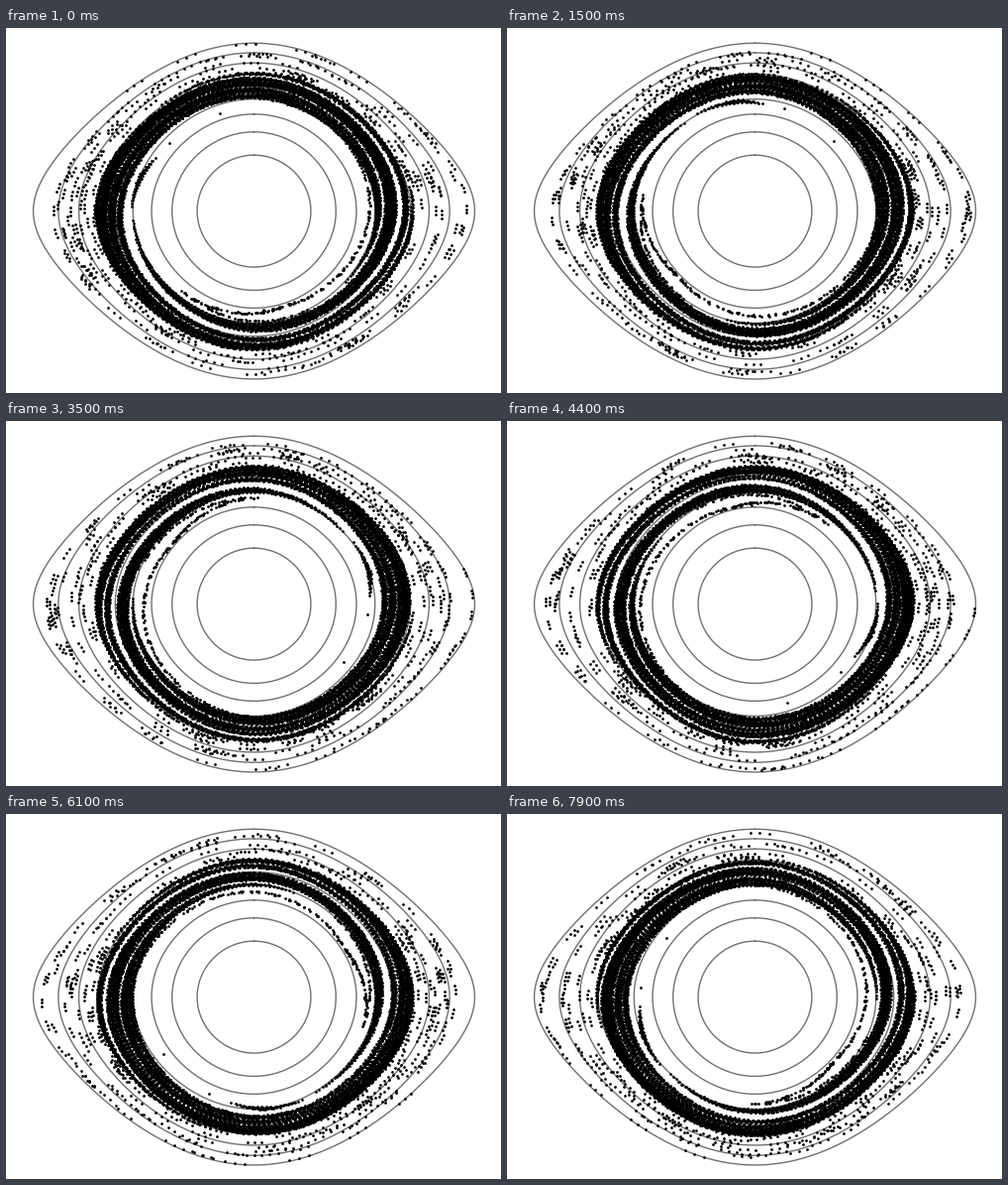
Write a matplotlib script that moves like this. It is 500x368 px and loops after 8000 ms.

```python
import numpy as np
import matplotlib.pyplot as plt
from matplotlib.animation import FuncAnimation

W, H, DPI = 500, 368, 100
CX, CY = 250.5, 184.6
SCALE = 89.25            # pixels per radian
FRAMES, INTERVAL = 80, 100
T0, DT = 78.0, 0.0796    # elapsed time and step, in units of 1/omega0
TAU = 2 * np.pi

rng = np.random.default_rng(4)


def agm(a, b):
    for _ in range(8):
        a, b = (a + b) / 2, np.sqrt(a * b)
    return a


def freq(k):
    return agm(1.0, np.sqrt(1 - k * k))


class Orbits:
    """Exact pendulum libration, as a Fourier series in the phase."""

    def __init__(self, k):
        self.w = freq(k)
        q = np.exp(-np.pi * self.w / agm(1.0, k))
        self.terms = [(n, 8 * q ** (n / 2) / (1 + q ** n)) for n in range(1, 14, 2)]

    def pixels(self, phase):
        x = sum(c / n * np.sin(n * phase) for n, c in self.terms)
        p = self.w * sum(c * np.cos(n * phase) for n, c in self.terms)
        return CX + SCALE * x, CY - SCALE * p


K_TAB = np.linspace(0.4, 0.97, 600)
W_TAB = freq(K_TAB)


def modulus(w):
    return np.interp(w, W_TAB[::-1], K_TAB[::-1])


rows_w, rows_phi = [], []


def add_row(w, phi):
    phi = np.atleast_1d(phi)
    rows_w.append(np.full(len(phi), w))
    rows_phi.append(phi)


# outer spiral: one triplet per row at the rim, more and wider spread inwards
for w in np.arange(0.6128, 0.806, 0.0029):
    d = (w - 0.6128) / 0.19
    triplet = 0.037 * np.arange(3)
    add_row(w, 2.02 - triplet)
    for _ in range(int(0.5 + 6 * d)):
        start = 2.0 - rng.uniform(0, min(TAU, 8 * d))
        add_row(w + rng.uniform(0, 0.0029), start - triplet)

# dense ring, cut by spiral gaps: phase, width at the outer and the inner rim
RING = (0.800, 0.884)
GAPS = [(5.8, 0.6, 1.9), (2.9, 0.0, 0.7), (1.35, 0.8, 0.0)]
for w in np.arange(*RING, 0.0013):
    phi = np.arange(0, TAU, 0.033) + rng.uniform(0, 0.033)
    keep = np.ones(len(phi), bool)
    for mid, *widths in GAPS:
        width = np.interp(w, RING, widths)
        keep &= np.abs((phi - mid + np.pi) % TAU - np.pi) > width / 2
    add_row(w, phi[keep])

# inner filament: a trailing band and a leading edge that meet at the tip
for w in np.arange(0.884, 0.9125, 0.0008):
    lead = min(0.86 + 140 * (0.9122 - w), 3.0)
    add_row(w, 0.8 + rng.uniform(0, 0.25, 3))
    add_row(w, lead - rng.uniform(0, 0.2, 3))

# second inner tip
add_row(0.9026, 4.69)
add_row(0.8959, 4.70)
for i, w in enumerate(np.arange(0.8935, 0.880, -0.0008)):
    add_row(w, 4.70 + 0.03 * i + 0.06 * np.arange(1 + i // 3))

omega = np.concatenate(rows_w)
phi0 = np.concatenate(rows_phi)
swarm = Orbits(modulus(omega))

fig = plt.figure(figsize=(W / DPI, H / DPI), dpi=DPI, facecolor="white")
ax = fig.add_axes([0, 0, 1, 1])
ax.set_xlim(0, W)
ax.set_ylim(H, 0)
ax.axis("off")

# energy levels, evenly spaced
loop = np.linspace(0, TAU, 400)
for level in range(1, 10):
    ax.plot(*Orbits(np.sqrt(0.1 * level)).pixels(loop), color="#707070", lw=1.0)

dots, = ax.plot([], [], "o", color="black", ms=2.0, mew=0, zorder=3)


def draw(i):
    dots.set_data(*swarm.pixels(phi0 + omega * (T0 + DT * i)))
    return dots,


anim = FuncAnimation(fig, draw, frames=FRAMES, interval=INTERVAL,
                     repeat=True, repeat_delay=0, blit=False)
plt.show()
```
